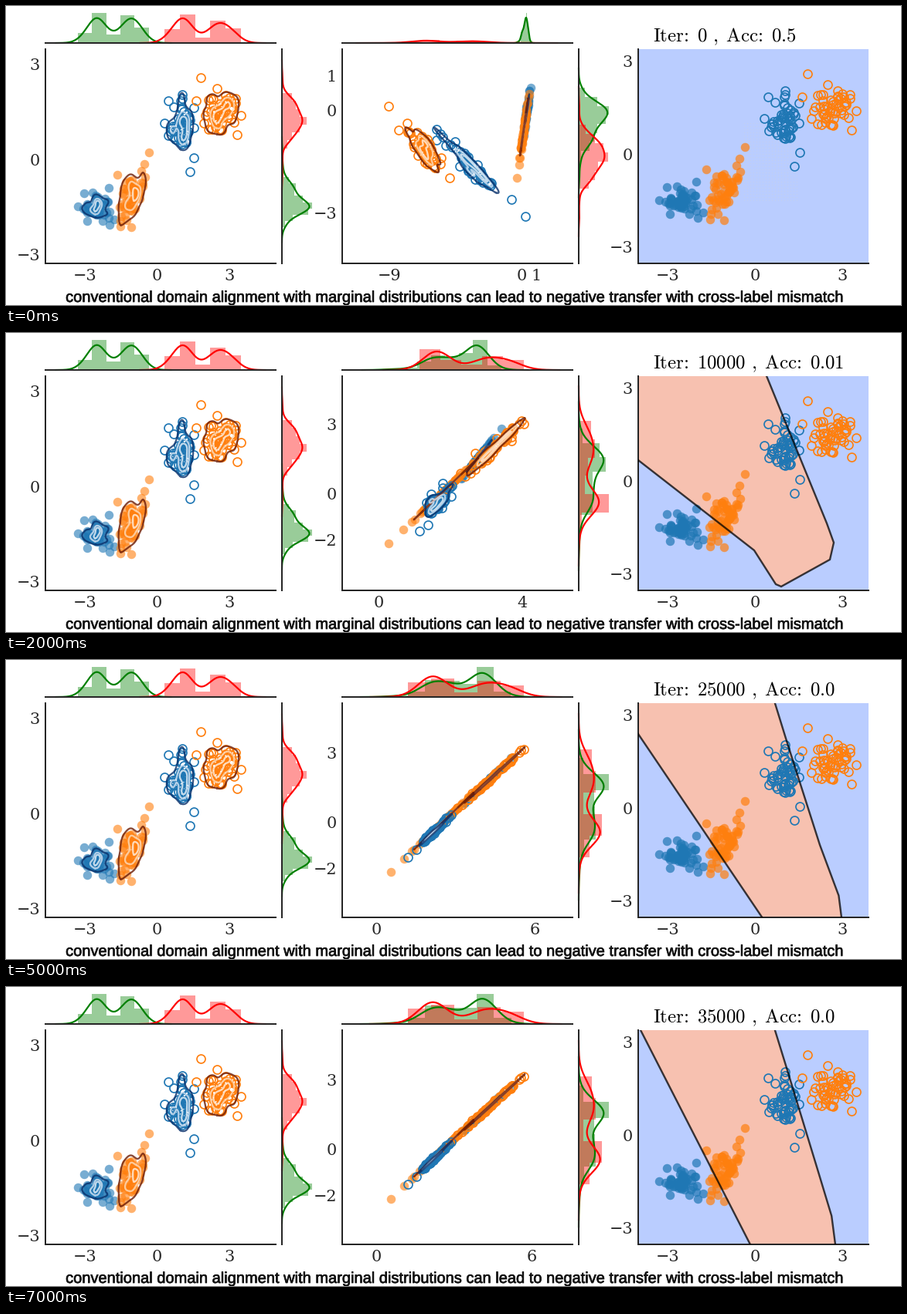
Write a matplotlib script that moves like this. It is 1158x388 px and loops after 8000 ms.

```python
import numpy as np
import matplotlib.pyplot as plt
from matplotlib import patheffects
from matplotlib.animation import FuncAnimation
from matplotlib.patches import Polygon, Rectangle

W, H, DPI = 1158, 388, 64
PX = 72 / DPI  # points per pixel
BLUE, ORANGE, INK = "#1f77b4", "#ff7f0e", "#262626"
TOP, BOTTOM = 56, 334
FLIP = np.array([1, -1])  # data y points up, pixel y points down
CAPTION = ("conventional domain alignment with marginal distributions can lead "
           "to negative transfer with cross-label mismatch")

plt.rcParams["mathtext.fontset"] = "cm"
rng = np.random.default_rng(7)
fig = plt.figure(figsize=(W / DPI, H / DPI), dpi=DPI, facecolor="white")
ax = fig.add_axes([0, 0, 1, 1])


def density(data, grid, width):
    """Gaussian kernel density along one axis, one row per data point."""
    return np.exp(-0.5 * ((grid - data[:, None]) / width) ** 2)


class Cluster:
    """Gaussian cloud given in pixels of the right panel, with a few outer points."""

    def __init__(self, color, filled, mean, std, rho, outer, n=50):
        self.color, self.filled = color, filled
        self.mean, self.std = np.array(mean), np.array(std)
        core = rng.normal(0, 0.9, (4 * n, 2))
        core = core[np.hypot(*core.T) < 1.9][:n]
        core[:, 1] = rho * core[:, 0] + np.sqrt(1 - rho ** 2) * core[:, 1]
        self.scores = np.vstack([core, (np.array(outer) - mean) / std * FLIP])
        self.rings = self.outline()

    def outline(self):
        """Density contours in standard scores."""
        grid = np.linspace(-4, 4, 90)
        width = 0.42 * self.scores.std(axis=0)
        kx, ky = (density(s, grid, w) for s, w in zip(self.scores.T, width))
        z = ky.T @ kx
        segments = ax.contour(grid, grid, z, levels=z.max() * np.array([0.22, 0.6, 0.85])).allsegs
        return [max(level, key=len) for level in segments]

    def pose(self, origin=(0, 0), scale=(1, 1), target=(0, 0)):
        """Centre and axis vectors after moving the panel origin and scaling."""
        centre = (self.mean - origin) * scale + target
        return np.vstack([centre, np.diag(self.std * FLIP * scale)])


CLUSTERS = [
    Cluster(BLUE, True, (876, 252), (14, 10), 0.0,
            [(845, 252), (855, 235), (893, 228), (859, 270), (902, 268), (895, 275)]),
    Cluster(ORANGE, True, (930, 231), (12, 21), 0.6,
            [(956, 183), (949, 198), (906, 212), (912, 270), (929, 278), (911, 277)]),
    Cluster(BLUE, False, (1007, 147), (10.5, 23), 0.0,
            [(1026, 126), (986, 118), (981, 146), (987, 162), (1020, 208), (1027, 190)]),
    Cluster(ORANGE, False, (1067, 134), (16, 15), 0.0,
            [(1037, 88), (1063, 102), (1030, 118), (1092, 115), (1100, 136), (1094, 161)]),
]

# Middle panel at the key steps: centre, x axis and y axis of each cluster
POSES = {
    0: [[(674, 135), (0.3, 2), (2, -13)],
        [(668.5, 170), (0.6, -2), (-3.7, 25)],
        [(598, 204), (4, -2), (-26, -27)],
        [(541, 187), (10, 4), (-9, -16)]],
    1: [[(615, 163), (2, -2), (19, -18)],
        [(562, 213), (1, -1), (-27, 26)],
        [(551, 214), (15, -11), (-21, -23)],
        [(618, 155), (20, -6), (-13, -13)]],
    2: [[(612, 160), (2, -2), (11, -14)],
        [(555, 216), (1, -1), (-27, 26)],
        [(559, 218), (4, 3.5), (11, -13)],
        [(629, 152), (20, -17), (5, -9)]],
    7: [[(620, 160), (2, -2), (13, -12.5)],
        [(553, 222), (1, -1), (-25, 24)],
        [(554, 222), (1, 0), (13.5, -13)],
        [(627, 154), (21, -19), (5, -5.3)]],
}
# Pixel position of the origin and pixels per unit, for both axes
SCALES = {0: [(667, 135), (19, 44.4)], 1: [(497, 193), (46, 35.6)],
          2: [(482, 208), (46.5, 30)], 7: [(479, 210), (33.5, 30)]}


def at(keys, step):
    """Key value, or the fast settling from step 2 to the end."""
    if step <= 2:
        return np.array(keys[step], float)
    k = 1 - 0.36 ** (step - 2)
    return (1 - k) * np.array(keys[2], float) + k * np.array(keys[7], float)


def region(step):
    """Outline of the salmon class; edges outside the panel stay hidden."""
    if step == 0:
        return None
    if step == 1:
        return [(858, 42), (932, 90), (965, 97), (992, 113), (1020, 127), (1075, 172),
                (1150, 236), (1150, 400), (1090, 349), (1053, 334), (1006, 320), (998, 317),
                (957, 264), (780, 166), (780, 42)]
    left = 165 - 23 * (step - 2)
    if step == 2:
        return [(780, -60), (978, 41), (1062, 247), (1071, 272), (1066, 294), (1003, 329),
                (996, 326), (968, 282), (818, left), (780, left - 30)]
    late = step - 4
    foot = 986 - 7.7 * late
    return [(780, -60), (990, 40), (1010, 105), (1054 - late, 240),
            (1082 - 4.6 * late, 310 - 4.3 * late), (1085 - 4 * late, BOTTOM), (1086, 380),
            (foot + 28, 380), (foot, BOTTOM), (818, left), (780, left - 50)]


def line(x, y, color=INK, width=2.0, **kw):
    ax.plot(x, y, color=color, lw=width * PX, **kw)


def spines(left, right):
    line([left, left, right], [TOP, BOTTOM, BOTTOM], solid_capstyle="projecting",
         solid_joinstyle="miter")


def ticks(left, origin, unit, xs, ys):
    style = dict(family="DejaVu Serif", size=20.8 * PX, color=INK, va="baseline")
    for v in xs:
        ax.text(origin[0] + v * unit[0], 356.3, f"{v}".replace("-", "−"), ha="center", **style)
    for v in ys:
        ax.text(left - 7, origin[1] - v * unit[1] + 7.6, f"{v}".replace("-", "−"),
                ha="right", **style)


def dots(points, c, alpha=0.6):
    if c.filled:
        look = dict(ms=11.5 * PX, mfc=c.color, mec="none", alpha=alpha)
    else:
        look = dict(ms=11 * PX, mfc="none", mec=c.color, mew=1.7 * PX)
    ax.plot(*points.T, "o", **look)


def contours(c, pose):
    if c.color == BLUE:
        colors = "#08306b", "#d6e5f4", "#eaf2fa"
    else:
        colors = "#6b1a04", "#fddcbc", "#fff0e2"
    for ring, color in reversed(list(zip(c.rings, colors))):
        line(*(pose[0] + ring @ pose[1:]).T, color=color, width=2.3, alpha=0.8)


def marginal(groups, base, vertical):
    """Histogram and density of each group, on one shared height."""
    shapes = []
    for data in groups:
        bars, edges = np.histogram(data, bins="fd", density=True)
        width = data.std() * len(data) ** -0.2
        t = np.linspace(data.min() - 3 * width, data.max() + 3 * width, 200)
        curve = density(data, t, width).mean(axis=0) / (width * np.sqrt(2 * np.pi))
        shapes.append((bars, edges, t, curve))
    scale = 39 / max(max(bars.max(), curve.max()) for bars, _, _, curve in shapes)
    for (bars, edges, t, curve), color in zip(shapes, ("green", "red")):
        style = dict(align="edge", color=color, alpha=0.4, lw=0)
        if vertical:
            ax.barh(edges[:-1], bars * scale, np.diff(edges), left=base, **style)
            line(base + curve * scale, t, color, 2.2)
        else:
            ax.bar(edges[:-1], -bars * scale, np.diff(edges), bottom=base, **style)
            line(t, base - curve * scale, color, 2.2)


def joint_panel(left, poses):
    """Scatter with contours and both marginals; returns all points."""
    right = left + 298
    side = right + 8
    clouds = [p[0] + c.scores @ p[1:] for c, p in zip(CLUSTERS, poses)]
    filled, hollow = np.vstack(clouds[:2]), np.vstack(clouds[2:])
    marginal([filled[:, 0], hollow[:, 0]], 48, False)
    marginal([filled[:, 1], hollow[:, 1]], side, True)
    line([left, right], [48, 48])
    line([side, side], [TOP, BOTTOM])
    for c, cloud in zip(CLUSTERS, clouds):
        dots(cloud, c)
    for c, pose in zip(CLUSTERS, poses):
        contours(c, pose)
    spines(left, right)
    return np.vstack(clouds)


def left_panel():
    origin, unit = (195.5, 199), (31.2, 41.2)
    scale = np.divide(unit, (37.8, 40.3))
    joint_panel(51, [c.pose((969, 192), scale, origin) for c in CLUSTERS])
    ticks(51, origin, unit, (-3, 0, 3), (-3, 0, 3))


def middle_panel(step):
    points = joint_panel(435, at(POSES, step))
    origin, unit = at(SCALES, step)
    values = (points - origin) / unit * FLIP
    # Label zero and the rounded extremes
    low = np.minimum(0, np.round(values.min(axis=0))).astype(int)
    high = np.round(values.max(axis=0)).astype(int)
    xs, ys = ({a, 0, b} for a, b in zip(low, high))
    ticks(435, origin, unit, xs, ys)


def right_panel(step):
    panel = Rectangle((818, TOP), 298, BOTTOM - TOP, fc="#bacdff", lw=0)
    ax.add_patch(panel)
    outline = region(step)
    if outline:
        ax.add_patch(Polygon(outline, fc="#f7c1b0", lw=0)).set_clip_path(panel)
    else:
        x, y = np.meshgrid(np.arange(955, 1026, 4), np.arange(152, 254, 4))
        ax.plot(x.ravel(), y.ravel(), "s", ms=PX, mfc="#cbd2e2", mec="none", alpha=0.6)
    for c in CLUSTERS:
        pose = c.pose()
        dots(pose[0] + c.scores @ pose[1:], c, alpha=0.7)
    if outline:
        edge = Polygon(outline, fill=False, ec="black", lw=2.4 * PX, alpha=0.75, zorder=3)
        ax.add_patch(edge).set_clip_path(panel)
    spines(818, 1116)
    ticks(818, (969, 192), (37.8, 40.3), (-3, 0, 3), (-3, 0, 3))


def title(step):
    accuracy = {0: "0.5", 1: "0.08", 2: "0.01"}.get(step, "0.0")
    parts = ["Iter:", str(5000 * step), ",", "Acc:", accuracy]
    gaps = [0.505, 0.38, 0.475, 0.505, 0]
    tex = "".join(rf"\text{{{p}}}\hspace{{{g}}}" for p, g in zip(parts, gaps))
    ax.text(837, 45.8, f"${tex}$", size=24.8 * PX, color="black", va="baseline")


def draw(step):
    ax.clear()
    ax.set_axis_off()
    ax.set_xlim(0, W)
    ax.set_ylim(H, 0)
    left_panel()
    middle_panel(step)
    right_panel(step)
    title(step)
    ax.text(579.5, 384, CAPTION, family="Liberation Sans", size=20.05 * PX, color="#111111",
            ha="center", va="baseline",
            path_effects=[patheffects.withStroke(linewidth=0.7 * PX, foreground="#111111")])
    return []


anim = FuncAnimation(fig, draw, frames=8, init_func=lambda: [], interval=1000,
                     repeat=True, repeat_delay=0)
plt.show()
```
